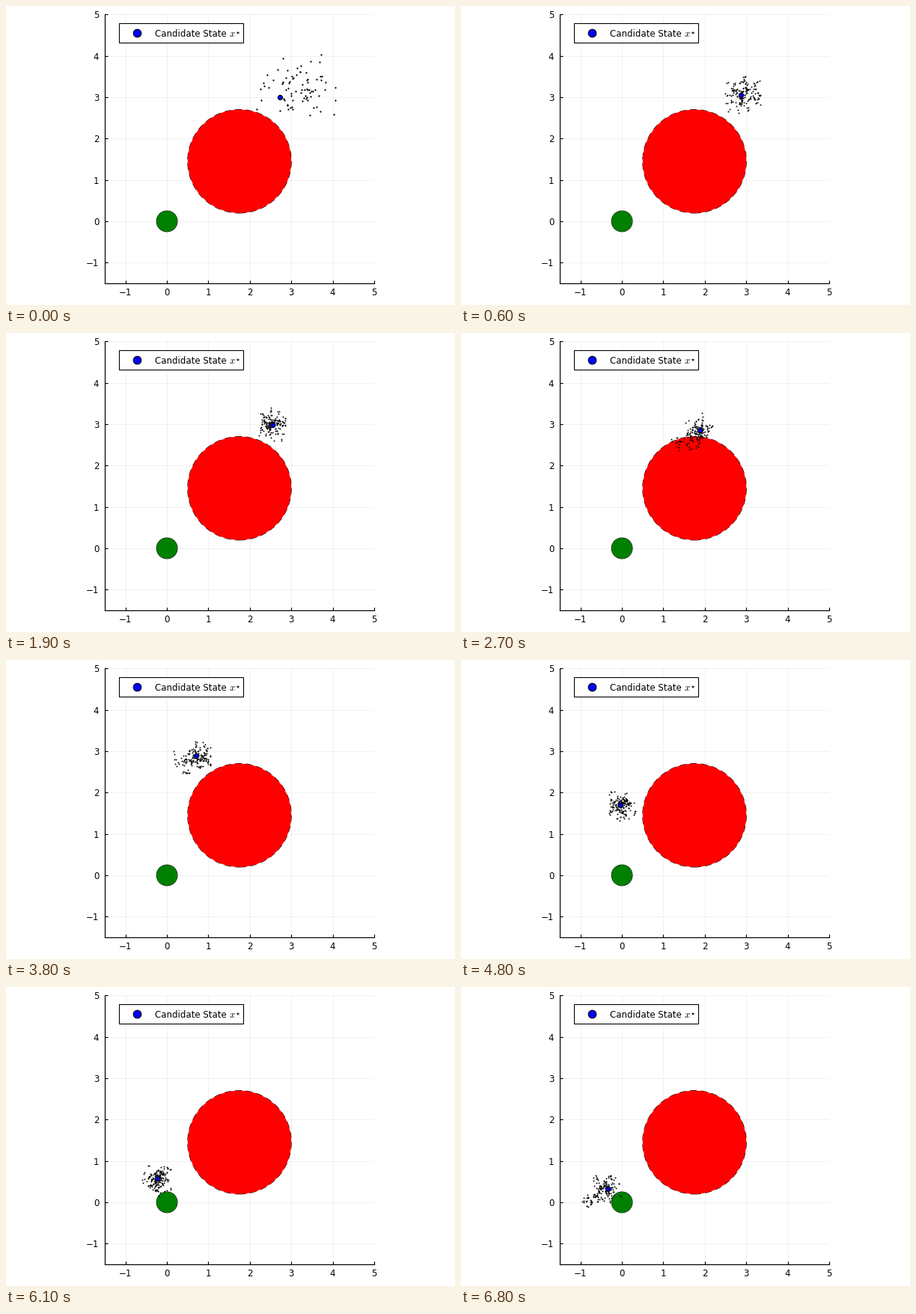
Recreate the animation shown at these times as a matplotlib script. Size 600 by 400 pixels, loop 6900 ms.

```python
import numpy as np
import matplotlib.pyplot as plt
from matplotlib.animation import FuncAnimation
from matplotlib.patches import Circle, Rectangle

W, H, DPI = 600, 400, 100
PX = 72 / DPI  # points per pixel
FRAMES, PAIRS = 69, 80

plt.rcParams.update({
    "font.family": "DejaVu Sans",
    "font.size": 11.7 * PX,
    "mathtext.fontset": "cm",
})

# Waypoints of the candidate, which rounds the obstacle to reach the goal
STEPS = np.array([0, 12, 27, 38, 48, 55, 68])
POINTS = np.array([(2.73, 3.0), (2.89, 3.09), (1.87, 2.85), (0.71, 2.89),
                   (-0.03, 1.7), (-0.14, 0.92), (-0.35, 0.33)])
SLOPES = np.gradient(POINTS, STEPS, axis=0)

rng = np.random.default_rng(11)


def candidate(k):
    """Cubic Hermite curve through the waypoints."""
    i = min(np.searchsorted(STEPS, k, side="right") - 1, len(STEPS) - 2)
    h = STEPS[i + 1] - STEPS[i]
    t = (k - STEPS[i]) / h
    return ((1 + 2 * t) * (1 - t) ** 2 * POINTS[i]
            + t * (1 - t) ** 2 * h * SLOPES[i]
            + t * t * (3 - 2 * t) * POINTS[i + 1]
            + t * t * (t - 1) * h * SLOPES[i + 1])


def wander():
    """Slowly drifting unit offsets for every step and particle."""
    z = rng.standard_normal((FRAMES, PAIRS, 2))
    for k in range(1, FRAMES):
        z[k] = 0.8 * z[k - 1] + 0.6 * z[k]
    return np.clip(z, -2.3, 2.3)


parents, splits = wander(), wander()
straggler = (np.arange(PAIRS) % 4 == 0)[:, None]


def particles(k):
    """A wide cloud that tightens; a quarter of it splits off and rejoins."""
    early = np.exp(-k / 3)
    lag = (1 - early) * np.cos(np.pi * (k - 27) / 13.7) ** 2
    centre = candidate(k) + early * np.array([0.39, 0.22])
    spread = 0.145 + early * np.array([0.3, 0.21])
    dots = centre + spread * parents[k] - straggler * lag * np.array([0.32, 0.25])
    return np.vstack([dots, dots + 0.045 * (1 - early) * splits[k]])


fig = plt.figure(figsize=(W / DPI, H / DPI), dpi=DPI, facecolor="white")
ax = fig.add_axes([132 / W, 1 - 371 / H, 360 / W, 359.7 / H])
ax.set(xlim=(-1.5, 5), ylim=(-1.5, 5), xticks=range(-1, 6), yticks=range(-1, 6))
ax.set_axisbelow(True)
ax.grid(color="black", alpha=0.06, lw=0.9 * PX)
ax.spines[["top", "right"]].set_visible(False)
ax.spines[["left", "bottom"]].set_linewidth(1.2 * PX)
ax.tick_params(direction="in", length=4 * PX, width=1.2 * PX)
ax.tick_params(axis="x", pad=4.6)
ax.tick_params(axis="y", pad=5.5)


def disc(x, y, r, color, ls="-"):
    # The fill covers the inner half of the outline
    ax.add_patch(Circle((x, y), r, fc="none", ec="black", lw=1.1 * PX, ls=ls,
                        zorder=2))
    ax.add_patch(Circle((x, y), r, fc=color, ec="none", zorder=2.1))


disc(1.75, 1.45, 1.25, "red", (0, (8, 5)))
disc(0, 0, 0.25, "green")


def pixel(x, y):
    """Figure coordinates of a pixel counted from the top left."""
    return x / W, 1 - y / H


def dot(size, **kw):
    return plt.Line2D([], [], marker="o", ls="none", ms=size * PX, mfc="blue",
                      mec="black", mew=1.1 * PX, **kw)


fig.add_artist(Rectangle(pixel(150.5, 48.8), 166.5 / W, 25.5 / H, fc="white",
                         ec="black", lw=1.1 * PX))
key = fig.add_artist(dot(10.6))
x, y = pixel(175, 36.2)
key.set_data([x], [y])
fig.text(*pixel(199, 40.7), "Candidate State")
fig.text(*pixel(298, 40.7), "$x$", size=13 * PX)
fig.text(*pixel(306, 38.3), r"$\star$", size=8.5 * PX)

cloud, = ax.plot([], [], "o", ms=1.9 * PX, mfc="black", mec="none", zorder=4)
best = ax.add_line(dot(6.2, zorder=5))


def update(k):
    best.set_data(*candidate(k)[:, None])
    cloud.set_data(*particles(k).T)
    return best, cloud


anim = FuncAnimation(fig, update, frames=FRAMES, interval=100, repeat=True,
                     repeat_delay=0)
plt.show()
```
